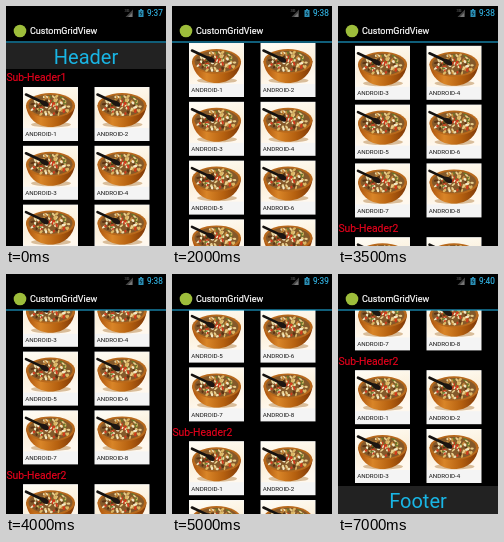
Animation of 160 by 240 pixels, one loop 7500 ms. Source, as an HTML page:

```html
<!DOCTYPE html>
<html lang="en">
<head>
<meta charset="utf-8">
<style>
html, body { margin: 0; width: 100%; height: 100%; overflow: hidden; background: #000; }
svg { display: block; width: 160px; height: 240px; font-family: Roboto, sans-serif; }
.big { font-size: 20px; fill: #19b5e4; text-anchor: middle; }
.sub { font-size: 10.4px; fill: #e6001c; stroke: #e6001c; stroke-width: .15; }
.label { font-size: 6.2px; fill: #111; }
</style>
</head>
<body>
<svg viewBox="0 0 160 240">
  <defs>
    <clipPath id="view"><rect y="36" width="160" height="204"/></clipPath>
    <linearGradient id="cloth" x2=".3" y2="1">
      <stop offset="0" stop-color="#fffdf6"/>
      <stop offset=".6" stop-color="#fbf0dc"/>
      <stop offset="1" stop-color="#fff8ee"/>
    </linearGradient>
    <linearGradient id="bowl">
      <stop offset="0" stop-color="#a9500b"/>
      <stop offset=".3" stop-color="#d98528"/>
      <stop offset=".65" stop-color="#b5600f"/>
      <stop offset="1" stop-color="#7d3707"/>
    </linearGradient>
    <g id="card">
      <rect width="55" height="54" fill="#f4f4f4"/>
      <rect x=".5" y=".5" width="54" height="40.5" fill="url(#cloth)"/>
      <ellipse cx="28" cy="37.5" rx="20" ry="3" fill="#d9bd9a"/>
      <path d="M3 18C4 31 14 40 27.5 40S51 31 52 18Z" fill="url(#bowl)"/>
      <ellipse cx="27.5" cy="18.5" rx="24.5" ry="12.5" fill="#b8691c"/>
      <ellipse cx="27.5" cy="18.5" rx="22" ry="10.8" fill="#84592a"/>
      <g id="food"></g>
      <path d="M3 7.5L20 15.5" stroke="#151210" stroke-width="2.6" stroke-linecap="round"/>
      <ellipse cx="21.5" cy="16.5" rx="4.6" ry="2.6" transform="rotate(28 21.5 16.5)" fill="#1d1612"/>
    </g>
  </defs>
  <rect width="160" height="240"/>
  <g clip-path="url(#view)">
    <g id="list">
      <rect y="37" width="160" height="26" fill="#222"/>
      <text class="big" x="80" y="58">Header</text>
      <rect y="447" width="160" height="28" fill="#222"/>
      <text class="big" x="80" y="469.3">Footer</text>
    </g>
  </g>
  <rect y="35.4" width="160" height="1.2" fill="#1c9cc9"/>
  <circle cx="14" cy="25" r="6.3" fill="#9dbd3b"/>
  <text x="24" y="27.7" font-size="9" fill="#fff" stroke="#fff" stroke-width=".2">CustomGridView</text>
  <text x="118.5" y="6" font-size="4" fill="#777">3G</text>
  <path d="M119.5 11L127 3.5V11Z" fill="#444"/>
  <path d="M122 11L126 7V11Z" fill="#777"/>
  <path d="M132.5 4H134V3H136V4H137.5V11H132.5Z" fill="#2b8fb6"/>
  <path d="M135.5 5L134 7.6H136L134.6 10" fill="none" stroke="#0b2c3a" stroke-width=".8"/>
  <text id="clock" x="141" y="10" font-size="8.2" fill="#33b5e5" stroke="#33b5e5" stroke-width=".15"></text>
</svg>
<script>
const $ = id => document.getElementById(id);
const list = $('list'), clock = $('clock');

function add(parent, tag, attrs, text = '') {
  const el = document.createElementNS('http://www.w3.org/2000/svg', tag);
  for (const key in attrs) el.setAttribute(key, attrs[key]);
  el.textContent = text;
  parent.append(el);
}

let seed = 11;
const rand = () => (seed = seed * 16807 % 2147483647) / 2147483647;

// Pasta and vegetables spread over the bowl
const colors = ['#eedfad', '#dcb766', '#d23a1c', '#e8cf8e', '#6a7a2c', '#f4e9c6', '#5c3414', '#c98a3c'];
for (let i = 0; i < 85; i++) {
  const angle = rand() * Math.PI * 2, r = Math.sqrt(rand());
  const x = 27.5 + 20.5 * r * Math.cos(angle), y = 18.5 + 9.8 * r * Math.sin(angle);
  add($('food'), 'ellipse', {
    cx: x, cy: y, rx: 1.3 + rand(), ry: .8 + rand() * .5,
    transform: `rotate(${rand() * 180} ${x} ${y})`, fill: colors[i % colors.length]
  });
}

function section(number, top, count) {
  add(list, 'text', { class: 'sub', x: .4, y: top + 75.4 }, 'Sub-Header' + number);
  for (let i = 0; i < count; i++) {
    const x = 17 + i % 2 * 71.5, y = top + 81 + (i >> 1) * 58.8;
    add(list, 'use', { href: '#card', x, y });
    add(list, 'text', { class: 'label', x: x + 2.3, y: y + 49.4 }, 'ANDROID-' + (i + 1));
  }
}
section(1, 0, 8);
section(2, 250.2, 4);

// One scroll position per half second
const scroll = [0, 11, 22, 33, 44, 62, 80, 100, 121, 142, 164, 183, 202, 219, 235];

function draw(now) {
  const step = Math.floor(now % 7500 / 500);
  list.setAttribute('transform', `translate(0 ${-scroll[step]})`);
  clock.textContent = ['9:37', '9:38', '9:39', '9:40'][Math.floor((step + 1) / 5)];
  requestAnimationFrame(draw);
}
draw(performance.now());
</script>
</body>
</html>
```
